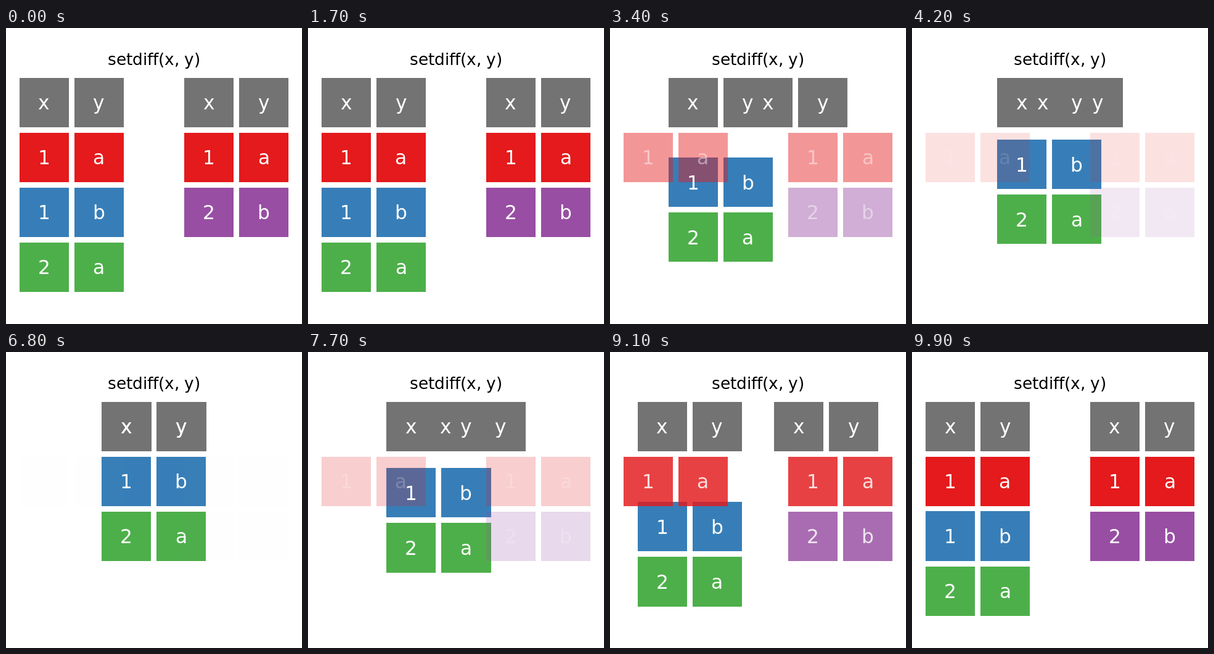
An HTML page with a canvas for the animation above (10 s loop, 480 px wide and 480 px high).

```html
<!DOCTYPE html>
<html lang="en">
<head>
<meta charset="utf-8">
<title>setdiff(x, y)</title>
<style>
html, body { margin: 0; width: 100%; height: 100%; overflow: hidden; background: #fff; }
canvas { display: block; width: 480px; height: 480px; }
</style>
</head>
<body>
<canvas id="stage" width="480" height="480"></canvas>
<script>
const ctx = document.getElementById("stage").getContext("2d");
const { round, cos, PI } = Math;
const LOOP = 10000, STEP = 100;
const PITCH = 480 / 5.39, SIZE = PITCH * 0.9;
const LEFT = PITCH * 0.245, TOP = 80.589;
const GRAY = "#737373", RED = "#e41a1c", BLUE = "#377eb8", GREEN = "#4daf4a", PURPLE = "#984ea3";

// Rows: labels, first column, row, fill, shift in cells, fades out
const rows = [
  ["xy", 0, 0, GRAY, 1.5, 0, false],
  ["xy", 3, 0, GRAY, -1.5, 0, false],
  ["1b", 0, 2, BLUE, 1.5, -1, false],
  ["2a", 0, 3, GREEN, 1.5, -1, false],
  ["1a", 0, 1, RED, 0, 0, true],
  ["1a", 3, 1, RED, 0, 0, true],
  ["2b", 3, 2, PURPLE, 0, 0, true]
];
const tiles = rows.flatMap(([labels, col, row, fill, dx, dy, fades]) =>
  [...labels].map((label, i) => ({ label, col: col + i, row, fill, dx, dy, fades })));

const font = px => { ctx.font = px + "px 'DejaVu Sans', sans-serif"; };
const width = s => round(ctx.measureText(s).width);
const sine = p => (1 - cos(PI * p)) / 2;

// 0 = both tables, 1 = the result
function progress(t) {
  if (t < 1600) return 0;
  if (t < 5000) return sine((t - 1600) / 3400);
  if (t < 6700) return 1;
  return 1 - sine((t - 6700) / 3300);
}

function drawTitle() {
  font(26.4);
  ctx.fillStyle = "#000";
  const letters = [..."setdiff(x, y)"];
  let x = round(240 - letters.reduce((sum, c) => sum + width(c), 0) / 2);
  for (const c of letters) {
    ctx.fillText(c, x, 60);
    x += width(c);
  }
}

function draw(t) {
  const k = progress(t);
  const place = tile => {
    ctx.globalAlpha = tile.fades ? 1 - k : 1;
    return [LEFT + (tile.col + tile.dx * k) * PITCH, TOP + (tile.row + tile.dy * k) * PITCH];
  };

  ctx.globalAlpha = 1;
  ctx.fillStyle = "#fff";
  ctx.fillRect(0, 0, 480, 480);
  drawTitle();

  for (const tile of tiles) {
    const [x, y] = place(tile);
    const l = round(x), top = round(y);
    ctx.fillStyle = tile.fill;
    ctx.fillRect(l, top, round(x + SIZE) - l, round(y + SIZE) - top);
  }

  font(31.3);
  ctx.fillStyle = "#fff";
  for (const tile of tiles) {
    const [x, y] = place(tile);
    ctx.fillText(tile.label, round(x + SIZE / 2 - width(tile.label) / 2), round(y + SIZE / 2 + 11.4));
  }
}

const start = performance.now();
function tick() {
  const t = (performance.now() - start) % LOOP;
  draw(Math.floor(t / STEP) * STEP);
  requestAnimationFrame(tick);
}
tick();
</script>
</body>
</html>
```
